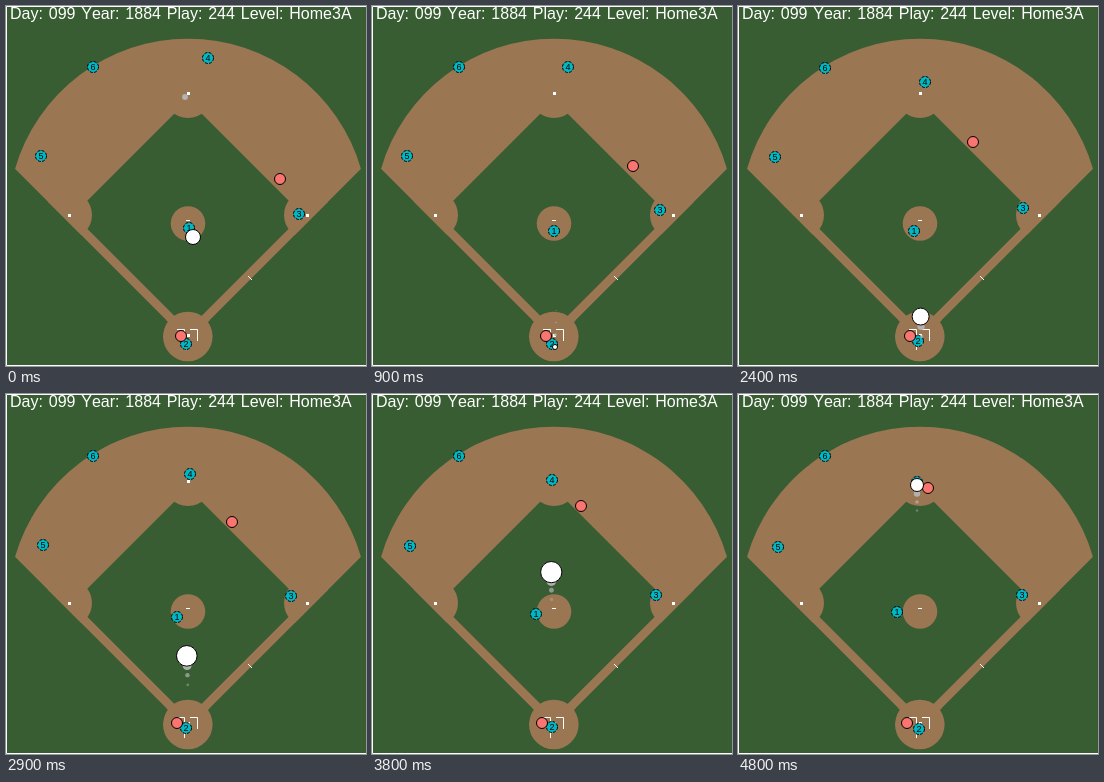
Animation, 360 px wide and 360 px high, one loop 4900 ms. Source, as an HTML page:

```html
<!DOCTYPE html>
<html lang="en">
<head>
<meta charset="utf-8">
<title>Infield play</title>
<style>
  html, body { margin: 0; width: 100%; height: 100%; overflow: hidden; background: #385d32; }
  svg { display: block; width: 360px; height: 360px; }
  text { font-family: "Liberation Sans", Arial, sans-serif; }
  .title { font-size: 16px; word-spacing: 1.4px; fill: #fff; font-kerning: none; }
  .grass { fill: #385d32; }
  .dirt { fill: #9b7653; }
  .line { fill: none; stroke: #fff; }
  .player { stroke: #000; fill: #fa7470; }
  .fielder { fill: #00b8c4; stroke-dasharray: 3 1.32; }
  .number { font-size: 9px; text-anchor: middle; }
  .ball { fill: #fff; stroke: #000; }
  .trail { fill: #b4b4b4; }
</style>
</head>
<body>
<svg id="stage" viewBox="0 0 360 360">
  <rect class="grass" width="360" height="360"/>
  <g class="dirt">
    <path d="M9 163A180 180 0 0 1 355 163L182 336Z"/>
    <path class="grass" d="M67.250 208.750L182 94L296.750 208.750L182 323.500Z"/>
    <circle cx="62" cy="209" r="24"/>
    <circle cx="302" cy="209" r="24"/>
    <circle cx="182" cy="88" r="24"/>
    <circle cx="182" cy="217.5" r="17.3"/>
    <circle cx="181.8" cy="330.5" r="24.8"/>
  </g>
  <!-- grass outside the foul lines, covering the corner base cutouts -->
  <path class="grass" d="M0 154L9 163L160 314L150 360H0Z"/>
  <path class="grass" d="M360 158L355 163L204 314L214 360H360Z"/>
  <g fill="#fff">
    <rect x="62" y="208" width="3" height="3"/>
    <rect x="300" y="208" width="3" height="3"/>
    <rect x="181" y="86" width="3" height="3"/>
    <rect x="181" y="328" width="3" height="3"/>
    <rect x="180" y="214" width="4" height="1"/>
  </g>
  <path class="line" d="M171 323.5H178.5V344M184 323.5H191.5V335M242 270L246 274"/>
  <path class="line" d="M360 .5H.5V359.5H360"/>
  <text class="title" x="4" y="13">Day: 099 Year: 1884 Play: 244 Level: Home3A</text>
</svg>
<script>
const STEP = 100, STEPS = 49, END = STEPS - 1;
const stage = document.getElementById("stage");

const mix = (a, b, u) => a + (b - a) * u;
const clamp = u => Math.min(1, Math.max(0, u));
const easeIn = p => u => u ** p;
const easeOut = p => u => 1 - (1 - u) ** p;
const settle = u => Math.sin(Math.PI / 2 * u ** 1.1);

// Each leg runs from where the last one ended to `to`, arriving at step `by`.
const players = [
  { label: "1", from: [182.5, 222], legs: [{ to: [181, 227], by: 19, ease: easeOut(1.3) }, { to: [159, 218], by: END, ease: easeOut(1.35) }] },
  { label: "2", from: [180, 338], legs: [{ to: [179.5, 332], by: 36, ease: easeIn(2) }, { to: [181, 335], by: END, ease: easeIn(1) }] },
  { label: "3", from: [293, 208], legs: [{ to: [284.4, 201.4], by: END, ease: easeOut(4) }] },
  { label: "4", from: [202, 52], legs: [{ to: [179, 88], by: END, ease: settle }] },
  { label: "5", from: [35, 150], legs: [{ to: [40, 153], by: END, ease: easeIn(1.7) }] },
  { label: "6", from: [87, 61], legs: [{ to: [87.4, 62], by: END, ease: easeOut(2) }] },
  { from: [274, 173], legs: [{ to: [190, 94], by: END, ease: easeIn(1.1) }] },
  { from: [175, 330], legs: [{ to: [169, 329], by: END, ease: easeIn(1) }] }
];

function position({ from, legs }, step) {
  let begin = 0;
  for (const { to, by, ease } of legs) {
    if (step <= by) {
      const u = ease((step - begin) / (by - begin));
      return from.map((v, n) => Math.round(mix(v, to[n], u)));
    }
    begin = by;
    from = to;
  }
  return from;
}

const CATCH = 9, RELEASE = 21.3;

// Radius stands for the ball's height above the ground.
function pitch(u) {
  return { cx: mix(187, 183, u), cy: mix(231, 341, u), r: mix(7.5, 2.5, u) };
}

function hold(u) {
  const lift = clamp(u * 2.5);
  return { cx: mix(183, 184, lift), cy: mix(341, 337.5, lift), r: mix(2.5, 7, lift) };
}

function toss(u) {
  return {
    cx: mix(184, 179, easeOut(3)(u)),
    cy: mix(337.5, 91, u * (1.09 - .09 * u)),
    r: mix(7, 6.5, u) + 16.8 * u * (1 - u)
  };
}

function ballAt(step) {
  if (step < 0) return toss(1);
  if (step <= CATCH) return pitch(step / CATCH);
  if (step < RELEASE) return hold((step - CATCH) / (RELEASE - CATCH));
  return toss((step - RELEASE) / (END - RELEASE));
}

function setAttrs(node, attrs) {
  for (const name in attrs) node.setAttribute(name, attrs[name]);
}

function add(tag, attrs, parent = stage) {
  const node = document.createElementNS("http://www.w3.org/2000/svg", tag);
  setAttrs(node, attrs);
  return parent.appendChild(node);
}

for (const p of players) {
  p.node = add("g", {});
  add("circle", { class: p.label ? "player fielder" : "player", r: 5.5 }, p.node);
  if (p.label) add("text", { class: "number", y: 3.3 }, p.node).textContent = p.label;
}

// The ball and its shrinking echoes, oldest at the bottom.
const balls = [3, 2, 1, 0].map(age => ({
  age,
  scale: age ? .45 / age : 1,
  node: add("circle", { class: age ? "trail" : "ball", opacity: age ? 1.2 - .25 * age : 1 })
}));

function draw(step) {
  for (const p of players) {
    p.node.setAttribute("transform", `translate(${position(p, step)})`);
  }
  for (const { age, scale, node } of balls) {
    const { cx, cy, r } = ballAt(step - age);
    setAttrs(node, { cx, cy, r: r * scale });
  }
}

const start = performance.now();
function tick() {
  draw(Math.floor((performance.now() - start) / STEP) % STEPS);
  requestAnimationFrame(tick);
}
tick();
</script>
</body>
</html>
```
